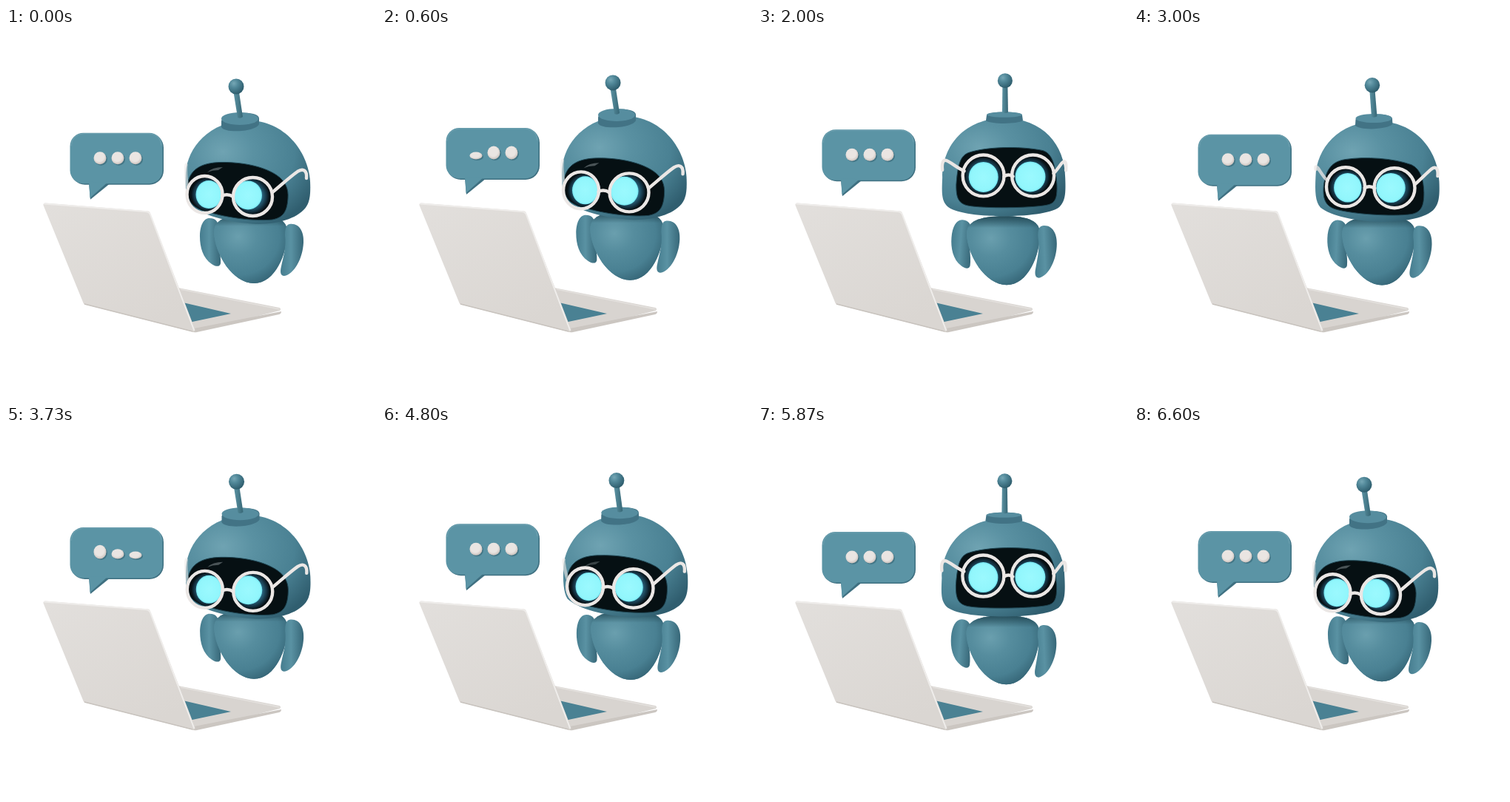
These frames come from a looping animation (500 by 500 pixels, 6630 ms). An HTML page:

```html
<!DOCTYPE html>
<html lang="en">
<head>
<meta charset="utf-8">
<title>Typing robot</title>
<style>
html, body { margin: 0; width: 100%; height: 100%; overflow: hidden; background: #fff; }
svg { display: block; width: 100vw; height: 100vh; }
.frame { fill: none; stroke: #ebe7e5; stroke-width: 4.4; stroke-linecap: round; stroke-linejoin: round; }
</style>
</head>
<body>
<svg viewBox="0 0 500 500">
  <defs>
    <radialGradient id="headFill" cx=".3" cy=".3" r=".82">
      <stop offset="0" stop-color="#6fa3b2"/><stop offset=".3" stop-color="#5a91a2"/>
      <stop offset=".7" stop-color="#4a8193"/><stop offset="1" stop-color="#305e6f"/>
    </radialGradient>
    <radialGradient id="bodyFill" cx=".33" cy=".32" r=".75">
      <stop offset="0" stop-color="#6a9fae"/><stop offset=".35" stop-color="#568d9e"/>
      <stop offset=".75" stop-color="#498092"/><stop offset="1" stop-color="#356576"/>
    </radialGradient>
    <linearGradient id="neckShade" x1="0" y1="0" x2="0" y2="1">
      <stop offset="0" stop-color="#173843" stop-opacity=".75"/>
      <stop offset=".17" stop-color="#173843" stop-opacity="0"/>
    </linearGradient>
    <linearGradient id="armFill">
      <stop offset="0" stop-color="#467d8f"/><stop offset=".45" stop-color="#5a92a3"/>
      <stop offset="1" stop-color="#376778"/>
    </linearGradient>
    <linearGradient id="stemFill">
      <stop offset="0" stop-color="#5c93a3"/><stop offset="1" stop-color="#376776"/>
    </linearGradient>
    <radialGradient id="ballFill" cx=".35" cy=".3" r=".7">
      <stop offset="0" stop-color="#76a7b5"/><stop offset=".4" stop-color="#518899"/>
      <stop offset="1" stop-color="#2f5e6e"/>
    </radialGradient>
    <radialGradient id="haloFill">
      <stop offset=".6" stop-color="#2a6680"/><stop offset=".85" stop-color="#14303f"/>
      <stop offset="1" stop-color="#061015"/>
    </radialGradient>
    <radialGradient id="eyeFill">
      <stop offset="0" stop-color="#9bf9fe"/><stop offset=".88" stop-color="#91f6fc"/>
      <stop offset="1" stop-color="#72e4f0"/>
    </radialGradient>
    <linearGradient id="lidFill" x1="0" y1="0" x2=".7" y2="1">
      <stop offset="0" stop-color="#e2dfdc"/><stop offset="1" stop-color="#dad6d2"/>
    </linearGradient>
    <radialGradient id="dotFill" cx=".45" cy=".4" r=".62">
      <stop offset=".6" stop-color="#eae5e2"/><stop offset="1" stop-color="#c9bfba"/>
    </radialGradient>
  </defs>

  <g id="laptop" stroke-linejoin="round">
    <path d="M232 353L369 380L254 409Z" fill="#d8d4d0" stroke="#d8d4d0" stroke-width="4"/>
    <path d="M372 383Q372 386 369 387L258 411Q254 412 251 410L254 406Z" fill="#cbc6c1"/>
    <path d="M236 353L370 380" fill="none" stroke="#e4e1de" stroke-width="1.5"/>
    <path d="M237 370.500L304 386L247 398Z" fill="#4a8193"/>
    <path d="M53 239L192 250L253 408L107 371Z" fill="url(#lidFill)" stroke="url(#lidFill)" stroke-width="5"/>
    <path d="M52 237.500L189 248Q193 248 195 252L254 408" fill="none" stroke="#efedeb" stroke-width="2" stroke-linecap="round"/>
    <path d="M106 373L252 410" fill="none" stroke="#c8c3be" stroke-width="1.500"/>
  </g>

  <g id="bubble">
    <g fill="#3f7081">
      <rect x="87.500" y="143" width="125.500" height="69" rx="19"/>
      <path d="M112 209L114 232L141 210Z"/>
    </g>
    <g fill="#5b94a5">
      <rect x="86.500" y="142" width="125" height="68.500" rx="18"/>
      <path d="M112 208L113.500 230L137 209Z"/>
    </g>
    <path d="M88 160Q89 143.500 106 143H193Q209 143.500 210 159" fill="none" stroke="#70a2b1"/>
    <g id="dots"></g>
  </g>

  <g id="torso">
    <path id="leftArm" fill="url(#armFill)" d="M275 257C284 257 288 263 287 272C285 290 291 305 290 318C289 323 284 323 278 319C266 311 262 296 262 282C262 267 267 257 275 257Z"/>
    <g>
      <path id="belly" fill="url(#bodyFill)" d="M281 276C281 260 296 252 332 252C366 252 380 259 380 276C380 304 364 345 335 345C306 345 282 305 281 276Z"/>
      <use href="#belly" style="fill:none"/>
      <path fill="url(#neckShade)" d="M281 276C281 260 296 252 332 252C366 252 380 259 380 276C380 304 364 345 335 345C306 345 282 305 281 276Z"/>
    </g>
    <path id="rightArm" fill="url(#armFill)" d="M383 265C396 263 403 275 402 290C401 312 389 333 376 335C371 335 370 330 372 322C375 308 379 295 377 280C377 270 379 266 383 265Z"/>
  </g>

  <!-- data-d and data-e hold the side pose | the front pose -->
  <g id="head">
    <path fill="url(#headFill)" data-d="M243 195C245 163 274 125 327 125C376 125 408 166 411 207C412 228 410 238 402 246C388 260 362 265 338 265C300 263 262 252 248 238C243 230 242 212 243 195Z | M249 202C249 158 280 122 332 122C385 122 415 158 415 202C416 225 415 234 407 242C395 251 362 254 332 254C302 254 270 251 257 242C248 234 248 225 249 202Z"/>
    <g id="antenna">
      <path fill="#427385" data-d="M291 126C292 114 341 110 342 122L342 130C338 140 296 143 291 134Z | M309 118C309 112 357 112 357 118L358 125C350 130 316 130 308 125Z"/>
      <ellipse fill="#568d9f" data-e="316 122.5 25 8.500 | 333 117 24 3.500"/>
      <path fill="url(#stemFill)" data-d="M307.5 87L315 87L320 120Q317 123 313 121Z | M330.5 79L337.5 79L338 114Q334 116 330 114Z"/>
      <ellipse fill="url(#ballFill)" data-e="311 79 10.500 10.500 | 334 71 10 10"/>
    </g>
    <path fill="#061013" stroke="#1d4350" data-d="M246 208C250 191 264 182 290 181.500C322 181 350 188 366 199C378 207 382 218 381 230C380 246 376 256 360 259C330 262 284 254 260 244C247 238 243 226 246 208Z | M268 212C270 185 273 172 285 168C305 161 350 158 385 165C398 169 402 185 404 210C405 230 402 237 390 239C370 243 305 244 284 240C270 237 268 228 268 212Z"/>
    <path id="glint" fill="#4a5457" d="M272 195Q279 188 293 188L287 192Q279 192 272 195Z"/>
    <ellipse fill="url(#haloFill)" data-e="273 225 23 23 | 305 200 26 26"/>
    <ellipse fill="url(#haloFill)" data-e="331 227 25 25 | 369 200 26 26"/>
    <ellipse fill="url(#eyeFill)" data-e="274 225 17.500 19 | 305 201 20 20.500"/>
    <ellipse fill="url(#eyeFill)" data-e="327 226 19 19.500 | 368.500 200.500 20.500 20.500"/>
    <g class="frame">
      <path id="leftTemple" data-d="M245 214C244 208 243 200 243 194C243 190 243 187 243.500 185 | M279 193C268 188 262 182 255 179C250 177 248 182 249 192"/>
      <path data-d="M360 222C372 212 384 201 394 194C402 189 407 193 406 203 | M400 196C404 192 407 187 411 182C415 178 417 181 416 192"/>
      <path data-d="M292 227Q299 223 307 228 | M333 200Q339 196 345 200"/>
      <ellipse data-e="268.500 225 24 25 | 305 199 28 28"/>
      <ellipse data-e="333.500 228 26.500 26 | 372 199 28.500 28"/>
    </g>
  </g>
</svg>
<script>
const PERIOD = 3315;
const byId = id => document.getElementById(id);
const mix = (a, b, k) => a + (b - a) * k;
const clamp = x => Math.min(1, Math.max(0, x));
const ease = x => x < .5 ? 4 * x ** 3 : 1 - 4 * (1 - x) ** 3;
const bell = (x, centre, width) => Math.exp(-(((x - centre) / width) ** 2));
const move = (id, x, y) => byId(id).setAttribute('transform', `translate(${x} ${y})`);
const swing = (id, angle, x, y) => byId(id).setAttribute('transform', `rotate(${angle} ${x} ${y})`);

// Height of a float that is at its highest (-1) at the given time.
const float = (t, peak) => -Math.cos(2 * Math.PI * (t - peak) / PERIOD);

const morphs = [...document.querySelectorAll('[data-d], [data-e]')].map(el => {
  const poses = (el.dataset.d || el.dataset.e).split('|').map(s => s.trim());
  const front = poses[1].match(/-?[\d.]+/g).map(Number);
  return { el, side: poses[0], front };
});

function turnHead(k) {
  for (const { el, side, front } of morphs) {
    let i = 0;
    const pose = side.replace(/-?[\d.]+/g, n => mix(+n, front[i++], k).toFixed(2));
    if (el.dataset.d) el.setAttribute('d', pose);
    else pose.split(' ').forEach((v, j) => el.setAttribute(['cx', 'cy', 'rx', 'ry'][j], v));
  }
  byId('glint').setAttribute('opacity', clamp(1 - 2 * k));
  byId('leftTemple').setAttribute('opacity', mix(.55, 1, k));
}

const DOT_RADIUS = 8.5;
const ellipse = (cx, fill, opacity) => {
  const el = document.createElementNS('http://www.w3.org/2000/svg', 'ellipse');
  for (const [name, value] of Object.entries({ cx, fill, opacity, rx: DOT_RADIUS }))
    el.setAttribute(name, value);
  return byId('dots').appendChild(el);
};
const dots = [127, 151, 175].map(x => ({
  shadow: ellipse(x + 1.5, '#2f5d6d', .55),
  face: ellipse(x, 'url(#dotFill)', 1)
}));

// One squash: a stretch before, a flat moment, a stretch after.
const squash = u => .15 * bell(u, -200, 70) + .13 * bell(u, 120, 70)
  - .42 * bell(u, 0, u < 0 ? 130 : 60);

function bounceDots(t) {
  dots.forEach(({ shadow, face }, i) => {
    const first = 615 - 100 * i;
    const height = DOT_RADIUS * (1 + squash(t - first) + squash(t - first - 615));
    const y = 176 + DOT_RADIUS - height;
    face.setAttribute('cy', y);
    face.setAttribute('ry', height);
    shadow.setAttribute('cy', y + 1.5);
    shadow.setAttribute('ry', height);
  });
}

function draw(time) {
  const t = time % PERIOD;
  const k = ease(clamp((t - 1180) / 980)) - ease(clamp((t - 2700) / 600));
  const headY = 5.4 * (float(t, 1000) - .32);
  const sway = .9 * (1 + float(t, 0));

  turnHead(k);
  bounceDots(t);
  move('bubble', 0, 6.3 * float(t, 1200) - 4.4);
  move('torso', .6 * sway, 4.5 * float(t, 860) - .3);
  move('head', sway - 1.4 * k, headY);
  move('antenna', sway * (1 - k), -.1 * headY);
  swing('leftArm', 4.5 * k, 275, 262);
  swing('rightArm', -2.5 * k, 388, 270);
}

const start = performance.now();
function tick() {
  draw(performance.now() - start);
  requestAnimationFrame(tick);
}
tick();
</script>
</body>
</html>
```
